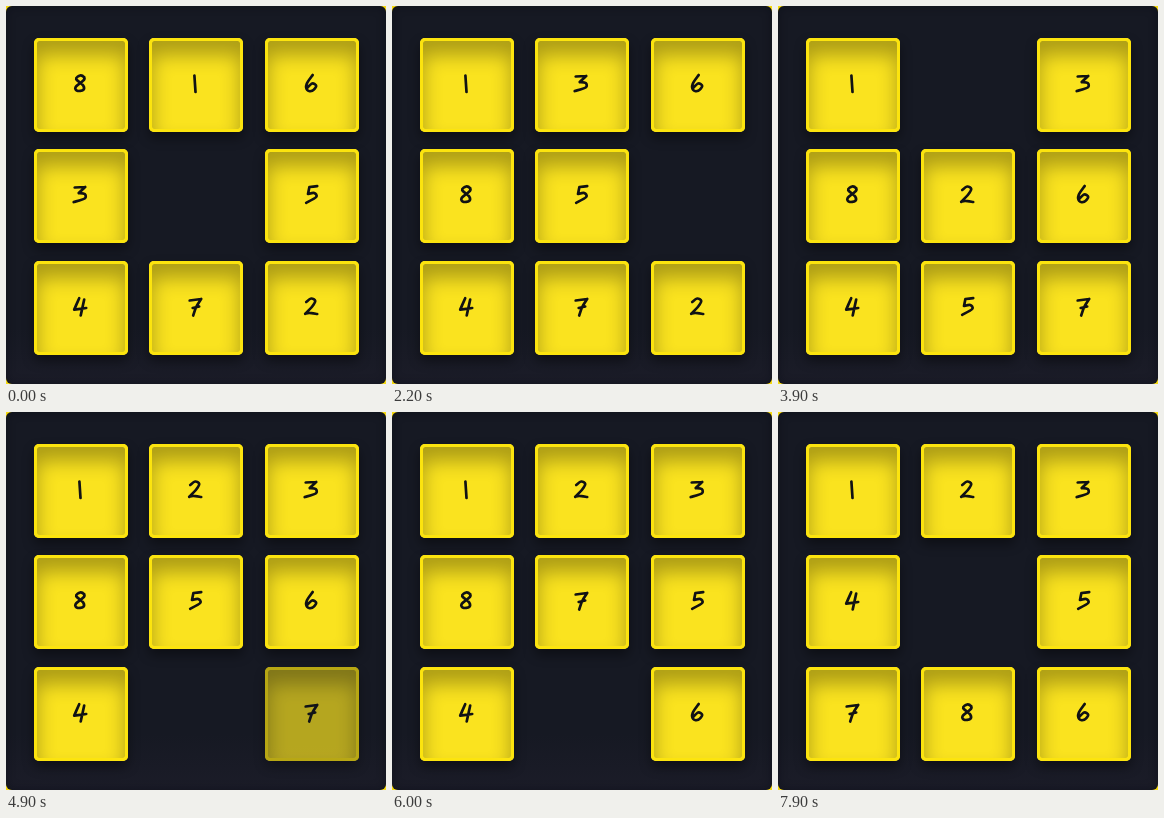
An HTML page for the animation above (8 s loop, 380 px wide and 378 px high).

```html
<!DOCTYPE html>
<html lang="en">
<head>
<meta charset="utf-8">
<title>Sliding puzzle</title>
<style>
html, body { margin: 0; width: 100%; height: 100%; overflow: hidden; background: #f5d90f; }
#board {
  position: absolute; left: 0; top: 0; width: 380px; height: 378px;
  border-radius: 6px; overflow: hidden;
  background: linear-gradient(#161923 85%, #1b1c28);
  box-shadow: inset 0 0 10px rgba(5, 7, 14, .4);
}
.tile {
  position: absolute; width: 94px; height: 94px; border-radius: 5px;
  background: #fae31f; overflow: visible;
  box-shadow: 0 6px 12px rgba(0, 0, 0, .42);
  font: 20px/94px "Open Sans", sans-serif; text-align: center; color: transparent;
}
.tile::before {
  content: ""; position: absolute; inset: 0; border-radius: 5px;
  border: 3.5px solid #fce40e;
  box-shadow: inset 0 14px 19px rgba(0, 0, 0, .31);
}
.tile::before { box-sizing: border-box; }
.tile svg { position: absolute; left: 0; top: 0; }
.tile path {
  fill: none; stroke: #111214; stroke-width: 2.7;
  stroke-linecap: round; stroke-linejoin: round;
}
</style>
</head>
<body>
<div id="board"></div>
<script>
const LOOP = 8000, PRESS = 110, EMPTY = 0;
const START = [8, 1, 6, 3, EMPTY, 5, 4, 7, 2];

// Bursts of play: the steps of the gap, evenly spaced in time.
const STEP = { L: -1, R: 1, U: -3, D: 3 };
const MOVES = [
  { from: 400, every: 400, path: 'LURDR' },
  { from: 2330, every: 233, path: 'DLUR' },
  { from: 3430, every: 400, path: 'ULDD' },
  { from: 4990, every: 300, path: 'RULD' },
  { from: 6280, every: 350, path: 'LUR' },
  { from: 7220, every: 200, path: 'DLUR' }
].flatMap(({ from, every, path }) =>
  [...path].map((way, i) => ({ time: from + i * every, step: STEP[way] })));

// Pen points of the handwritten digits around the tile centre; | starts a new stroke.
const PEN = {
  1: '-.8,-8.5 .3,8',
  2: '-5,-5 0,-8.5 4,-6 1,-.5 -6,6.8 | -6,6.8 -2,5.8 6,7',
  3: '-5.5,-7.5 5,-8 | 5,-8 -1.5,-2 | -1.5,-2 4.5,-1 4.5,3.5 -6.5,7',
  4: '-1,-8.8 -6,2.6 | -6,2.6 6,1 | 4,-7.5 .5,8.5',
  5: '6,-8.8 -1.8,-8 | -1.8,-8 -3.2,-1 | -3.2,-1 3,-2 5,2 -5,7.8',
  6: '1.5,-9 -4.5,0 -4,6 1,6.8 5,2 1,-.5 -4,4',
  7: '-5.5,-6.5 6,-8 | 6,-8 1,0 -2,8.5 | -2.5,1 4,-.5',
  8: '4,-7 0,-8.5 -4,-5 3,1.5 3,6 -3,6.8 -4.5,3 4,-4.5 2.5,-8'
};

// Smooth curve through all points of a stroke (Catmull-Rom).
function smooth(stroke) {
  const p = stroke.trim().split(' ').map(pair => pair.split(',').map(Number));
  const at = i => p[Math.max(0, Math.min(p.length - 1, i))];
  const handle = (i, sign) => at(i).map((v, k) => v + sign * (at(i + 1)[k] - at(i - 1)[k]) / 6);
  return 'M' + p[0] + p.slice(1).map((end, i) =>
    `C${handle(i, 1)} ${handle(i + 1, -1)} ${end}`).join('');
}

const board = document.getElementById('board');
const tiles = {};
for (const digit in PEN) {
  const tile = tiles[digit] = document.createElement('div');
  tile.className = 'tile';
  tile.innerHTML = `${digit}<svg width="94" height="94" viewBox="-46.2 -46 94 94">` +
    `<path d="${PEN[digit].split('|').map(smooth).join('')}"/></svg>`;
  board.append(tile);
}

function draw(now) {
  const t = now % LOOP;
  const cells = [...START];
  let gap = cells.indexOf(EMPTY);
  let pressed = EMPTY;
  for (const { time, step } of MOVES) {
    const next = gap + step;
    if (t < time) {
      if (t >= time - PRESS) pressed = cells[next];
      break;
    }
    cells[gap] = cells[next];
    cells[next] = EMPTY;
    gap = next;
  }
  cells.forEach((digit, i) => {
    if (digit === EMPTY) return;
    const style = tiles[digit].style;
    style.left = 27.5 + i % 3 * 115.7 + 'px';
    style.top = 31.5 + Math.floor(i / 3) * 111.8 + 'px';
    style.opacity = digit === pressed ? .7 : 1;
  });
}

const begin = performance.now();
function frame() {
  draw(performance.now() - begin);
  requestAnimationFrame(frame);
}
frame();
</script>
</body>
</html>
```
